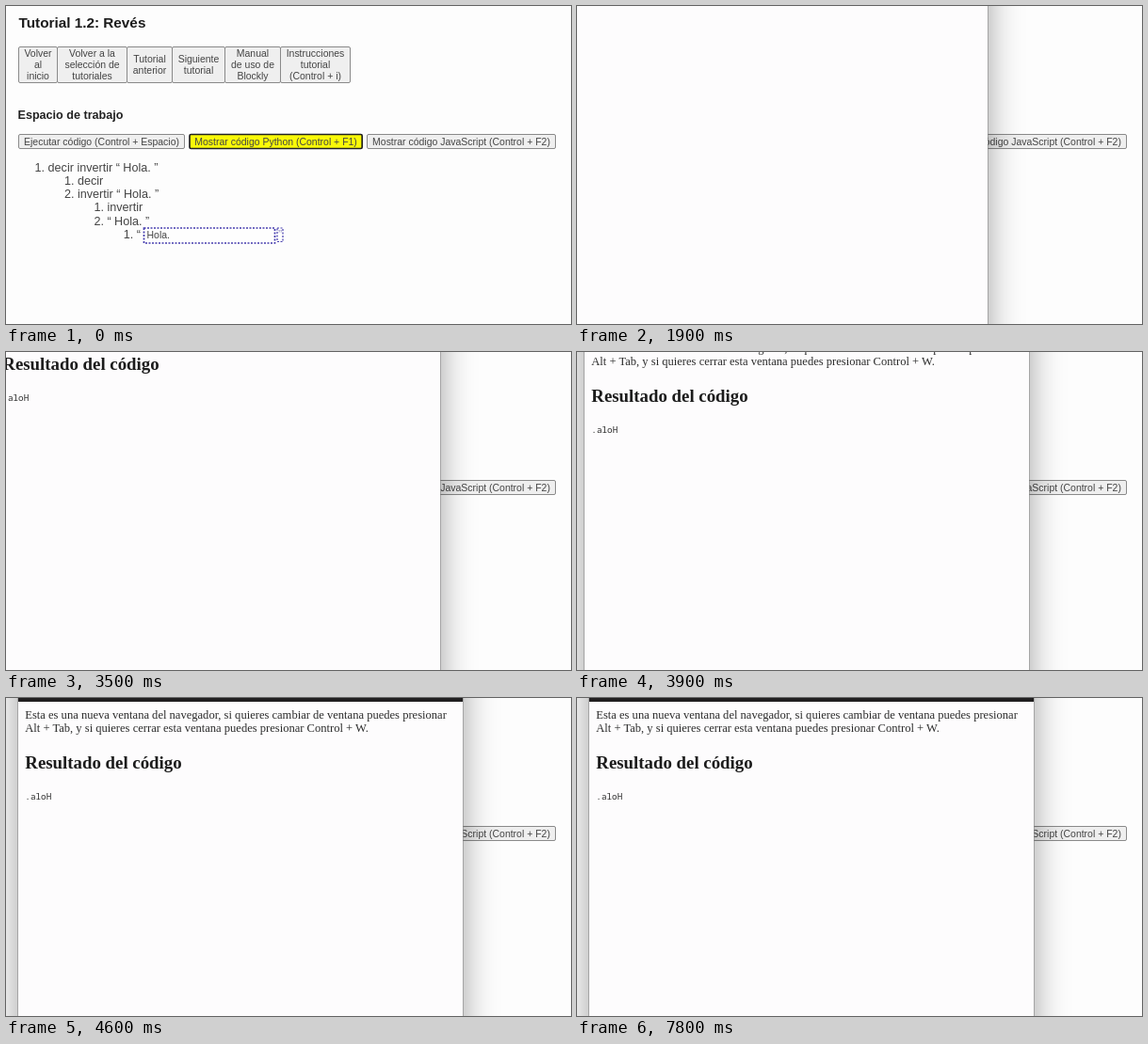
An HTML page that plays this animation: 600 px wide and 338 px high, repeating every 8 s.

```html
<!DOCTYPE html>
<html lang="es">
<head>
<meta charset="utf-8">
<title>Tutorial</title>
<style>
  html, body { margin: 0; width: 100%; height: 100%; overflow: hidden; background: #fdfdfd; }
  #stage { position: relative; width: 600px; height: 338px; overflow: hidden; }
  #page { position: absolute; inset: 0; font: 12.6px "Liberation Sans", Arial, sans-serif; fill: #444; }
  #page .title { font-weight: bold; font-size: 15.3px; fill: #1c1c1c; }
  #page .heading { font-weight: bold; fill: #222; }
  #page .label { font-size: 10.47px; }
  .box { fill: #efefef; stroke: #8a8a8a; stroke-width: 1; }
  .focused .box { fill: #fafa08; stroke: #222; stroke-width: 1.7; }
  .dotted { fill: #fefefe; stroke: #453dae; stroke-width: 1.7; stroke-dasharray: 2 1.5; }
  #popup { position: absolute; left: 13px; top: -60px; width: 472px; height: 640px; box-sizing: border-box;
    background: #fdfcfd; border-top: 64px solid #211f20;
    box-shadow: 0 0 0 .6px #8a8a8a, 0 6px 34px rgba(0, 0, 0, .38); color: #2c2c2c; }
  #popup * { position: absolute; left: 7.3px; margin: 0; white-space: nowrap; }
  #popup p { top: 7px; font: 12.56px/14.2px "Liberation Serif", Times, serif; }
  #popup h2 { top: 54px; font: bold 18.84px/22px "Liberation Serif", Times, serif; color: #1c1c1c; }
  #popup pre { top: 94px; font: 9.35px/14px "Noto Sans Mono", monospace; }
</style>
</head>
<body>
<div id="stage">
  <svg id="page" width="600" height="338"></svg>
  <div id="popup">
    <p>Esta es una nueva ventana del navegador, si quieres cambiar de ventana puedes presionar<br>Alt + Tab, y si quieres cerrar esta ventana puedes presionar Control + W.</p>
    <h2>Resultado del código</h2>
    <pre>.aloH</pre>
  </div>
</div>
<script>
const LOOP = 8000, STEP = 100, FOCUS_AT = 500, POPUP_AT = 1600;
// time, x offset, y offset of the dragged window
const DRAG = [[3000, -49, -114], [3500, -24, -56], [3900, -5, -22], [4300, -.4, -10], [4500, 0, 0]];

const page = document.getElementById('page');
const popup = document.getElementById('popup');

function add(parent, tag, attrs, text = '') {
  const el = document.createElementNS('http://www.w3.org/2000/svg', tag);
  for (const key in attrs) el.setAttribute(key, attrs[key]);
  el.textContent = text;
  return parent.appendChild(el);
}

function addButton(left, right, top, bottom, lines) {
  const group = add(page, 'g', {});
  add(group, 'rect', { class: 'box', x: left + .5, y: top + .5, width: right - left - 1, height: bottom - top - 1, rx: 1.5 });
  lines.forEach((line, i) => add(group, 'text', {
    class: 'label', 'text-anchor': 'middle', x: (left + right) / 2,
    y: (top + bottom) / 2 + 3.7 + (i - (lines.length - 1) / 2) * 12
  }, line));
  return group;
}

add(page, 'text', { class: 'title', x: 13.5, y: 22.8 }, 'Tutorial 1.2: Revés');
add(page, 'text', { class: 'heading', x: 12.5, y: 119.5 }, 'Espacio de trabajo');

[
  [13, 55, 'Volver|al|inicio'],
  [54, 129, 'Volver a la|selección de|tutoriales'],
  [128, 177, 'Tutorial|anterior'],
  [176, 233, 'Siguiente|tutorial'],
  [232, 292, 'Manual|de uso de|Blockly'],
  [291, 366, 'Instrucciones|tutorial|(Control + i)']
].forEach(([left, right, text]) => addButton(left, right, 43, 82, text.split('|')));

const [runButton, pythonButton] = [
  [13, 190, 'Ejecutar código (Control + Espacio)'],
  [194.5, 378.7, 'Mostrar código Python (Control + F1)'],
  [383, 584, 'Mostrar código JavaScript (Control + F2)']
].map(([left, right, text]) => addButton(left, right, 136, 152, [text]));

[
  [0, '1. decir invertir “ Hola. ”'],
  [1, '1. decir'],
  [1, '2. invertir “ Hola. ”'],
  [2, '1. invertir'],
  [2, '2. “ Hola. ”'],
  [3, '1. “']
].forEach(([depth, text], row) => add(page, 'text', { x: 30.6 + depth * 31.4, y: 175.8 + row * 14.2 }, text));

add(page, 'rect', { class: 'dotted', x: 146.5, y: 236, width: 139, height: 16 });
add(page, 'text', { class: 'label', x: 149.5, y: 247.3 }, 'Hola.');
add(page, 'rect', { class: 'dotted', x: 288, y: 236, width: 6, height: 14.5, style: 'stroke-width:1.2' });
add(page, 'text', { x: 289, y: 246.5, style: 'fill:#9a97c4' }, '”');

function dragOffset(t) {
  if (t <= DRAG[0][0]) return DRAG[0].slice(1);
  const next = DRAG.findIndex(([time]) => time > t);
  if (next < 0) return [0, 0];
  const a = DRAG[next - 1], b = DRAG[next];
  const k = (t - a[0]) / (b[0] - a[0]);
  return [1, 2].map(i => a[i] + (b[i] - a[i]) * k);
}

function draw() {
  const t = Math.floor(performance.now() % LOOP / STEP) * STEP;
  pythonButton.classList.toggle('focused', t < FOCUS_AT);
  runButton.classList.toggle('focused', t >= FOCUS_AT && t < POPUP_AT);
  popup.style.visibility = t < POPUP_AT ? 'hidden' : 'visible';
  const [x, y] = dragOffset(t);
  popup.style.transform = `translate(${x}px, ${y}px)`;
  requestAnimationFrame(draw);
}
draw();
</script>
</body>
</html>
```
